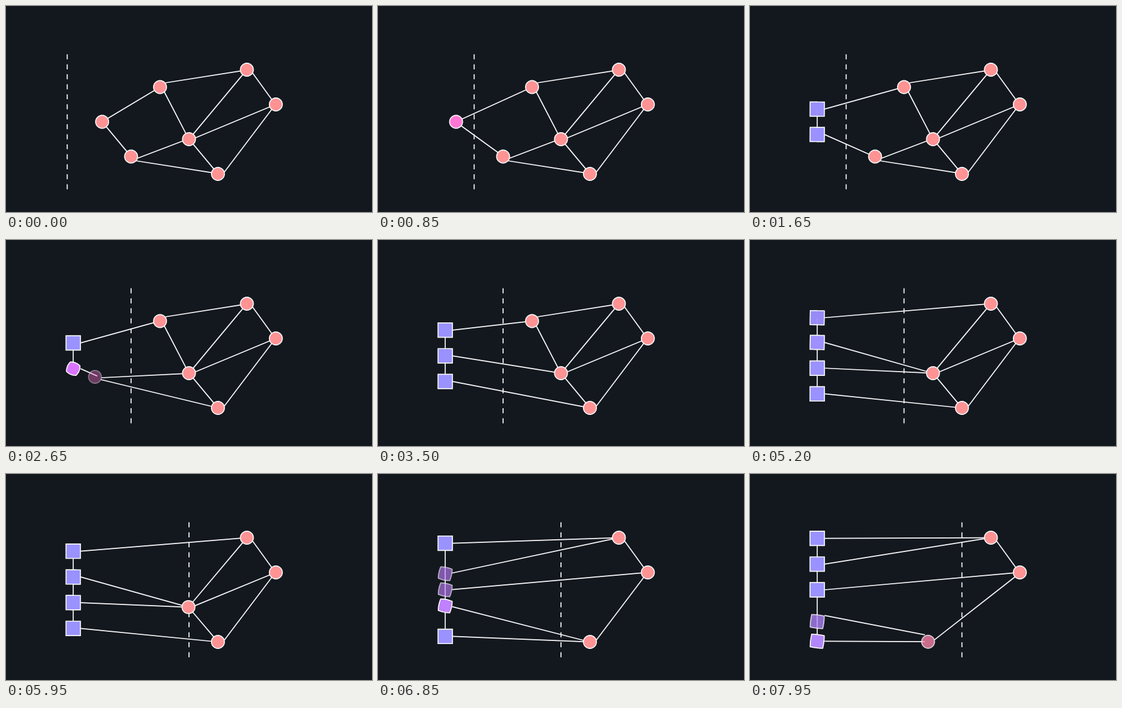
Animation of 600x338 px, one loop 8000 ms. Source, as an HTML page with a canvas:

```html
<!DOCTYPE html>
<html lang="en">
<head>
<meta charset="utf-8">
<title>Sweep line over a graph</title>
<style>
  html, body { margin: 0; width: 100%; height: 100%; overflow: hidden; background: #13181e; }
  canvas { display: block; }
</style>
</head>
<body>
<canvas id="stage" width="600" height="338"></canvas>
<script>
const ctx = document.getElementById('stage').getContext('2d');
const LOOP = 8000, FRAME = 50, STEP = 600, LEAD = 80;
const BACK = '#13181e', WHITE = '#f8f8fa';
const SALMON = [255, 147, 148], MAGENTA = [255, 100, 252], LAVENDER = [154, 146, 255];
const QUEUE_X = 110.2, MID_Y = 190, GAP = 42.2, RADIUS = 10.6, HALF = 11.8;

const grid = (col, row) => ({ x: 157.6 + 47.46 * col, y: 104.5 + 28.5 * row });
const nodes = {
  A: grid(0, 3), B: grid(1, 5), C: grid(2, 1), D: grid(3, 4),
  E: grid(4, 6), F: grid(5, 0), G: grid(6, 2)
};
const edges = ['AC', 'AB', 'CF', 'CD', 'BD', 'BE', 'DF', 'DG', 'DE', 'FG', 'EG'];
// Where some edges leave their node, relative to its centre.
const exits = {
  CF: [9, -7], CD: [7, 8], BE: [8, 7], BD: [10, 3], DG: [10, -2], EG: [10.5, -3], FG: [9, 5]
};
const events = [
  { node: 'A', ins: [], outs: ['AC', 'AB'], y: MID_Y },
  { node: 'B', ins: ['AB'], outs: ['BD', 'BE'] },
  { node: 'C', ins: ['AC'], outs: ['CF', 'CD'] },
  { node: 'D', ins: ['CD', 'BD'], outs: ['DF', 'DG', 'DE'], y: MID_Y },
  { node: 'E', ins: ['DE', 'BE'], outs: ['EG'], y: MID_Y + 2 * GAP }
];
const sweepStops = [99.3, ...['A', 'B', 'C', 'D', 'E'].map(n => nodes[n].x)];

const lerp = (a, b, u) => a + (b - a) * u;
const mix = (a, b, u) => a.map((v, i) => lerp(v, b[i], u));
const sigmoid = v => 1 / (1 + Math.exp(-v));
const smooth = t => (sigmoid(10 * (t - 0.5)) - sigmoid(-5)) / (1 - 2 * sigmoid(-5));

function toward(from, to, r) {
  const d = Math.hypot(to.x - from.x, to.y - from.y);
  return [from.x + (to.x - from.x) * r / d, from.y + (to.y - from.y) * r / d];
}

function layout(slots) {
  return Object.fromEntries(slots.map((e, i) => [e, MID_Y + (i - (slots.length - 1) / 2) * GAP]));
}

function restLines(slots, done) {
  const ys = layout(slots), lines = {};
  for (const e of edges) {
    if (done.includes(e[1])) continue;
    const queued = e in ys, to = nodes[e[1]];
    const from = queued ? { x: QUEUE_X, y: ys[e] } : nodes[e[0]];
    const exit = exits[e];
    const start = queued ? [from.x + 12, from.y]
      : exit ? [from.x + exit[0], from.y + exit[1]]
      : toward(from, to, RADIUS);
    lines[e] = [...start, ...toward(to, from, RADIUS)];
  }
  return lines;
}

// Resting and merged arrangement around each event.
let slots = [], done = [];
for (const ev of events) {
  ev.slots = slots;
  ev.done = done;
  ev.before = restLines(slots, done);
  ev.ys = layout(slots);
  ev.y = ev.y ?? ev.ys[ev.ins[0]];
  ev.merged = { ...ev.before };
  for (const e of ev.ins) {
    const [x, y] = ev.before[e];
    ev.merged[e] = [x, y, x, y];
  }
  const hub = { x: QUEUE_X, y: ev.y };
  for (const e of ev.outs) {
    const to = nodes[e[1]];
    ev.merged[e] = [...toward(hub, to, RADIUS), ...toward(to, hub, RADIUS)];
  }
  const at = ev.ins.length ? slots.indexOf(ev.ins[0]) : 0;
  slots = [...slots.slice(0, at), ...ev.outs, ...slots.slice(at + ev.ins.length)];
  done = [...done, ev.node];
  ev.nextSlots = slots;
  ev.nextYs = layout(slots);
  ev.after = restLines(slots, done);
}

function stroke(x1, y1, x2, y2) {
  ctx.beginPath();
  ctx.moveTo(x1, y1);
  ctx.lineTo(x2, y2);
  ctx.stroke();
}

// Blend of square (round = 0) and circle (round = 1), paired from the square's
// upper right corner and the circle's rightmost point, anticlockwise.
function blob(x, y, round, color, alpha = 1) {
  const corners = [[1, -1], [-1, -1], [-1, 1], [1, 1], [1, -1]];
  ctx.beginPath();
  for (let i = 0; i < 64; i++) {
    const side = i >> 4, angle = i / 64 * 2 * Math.PI;
    const [sx, sy] = mix(corners[side], corners[side + 1], i % 16 / 16);
    ctx.lineTo(x + lerp(sx * HALF, Math.cos(angle) * RADIUS, round),
               y + lerp(sy * HALF, -Math.sin(angle) * RADIUS, round));
  }
  ctx.closePath();
  ctx.globalAlpha = alpha;
  ctx.fillStyle = `rgb(${color.map(Math.round)})`;
  ctx.fill();
  ctx.stroke();
  ctx.globalAlpha = 1;
}

function queueItems(ev, phase, u) {
  const splitting = phase === 2;
  return (splitting ? ev.nextSlots : ev.slots).map(e => {
    const group = splitting ? ev.outs : ev.ins;
    const active = phase > 0 && group.includes(e);
    const last = e === group[group.length - 1];
    const from = splitting ? (active ? ev.y : ev.ys[e]) : ev.ys[e];
    const to = splitting ? ev.nextYs[e] : active ? ev.y : from;
    return {
      y: lerp(from, to, u),
      round: active ? (splitting ? 1 - u : u) : 0,
      alpha: active && !last ? (splitting ? u : 1 - u) : 1
    };
  });
}

function draw(time) {
  const clock = (time + LEAD) / STEP, step = Math.floor(clock);
  const index = Math.floor(step / 3), phase = step % 3;
  const ev = events[index], u = smooth(clock - step);

  ctx.fillStyle = BACK;
  ctx.fillRect(0, 0, 600, 338);
  ctx.strokeStyle = WHITE;
  ctx.lineWidth = 1.7;

  const sweepX = lerp(sweepStops[index], sweepStops[index + 1], phase ? 1 : u);
  ctx.setLineDash([8.2, 8.2]);
  stroke(sweepX, 79.3, sweepX, 301);
  ctx.setLineDash([]);

  const [from, to] = [[ev.before, ev.before], [ev.before, ev.merged], [ev.merged, ev.after]][phase];
  for (const e in to) stroke(...mix(from[e], to[e], u));

  const items = queueItems(ev, phase, u);
  if (items.length > 1) {
    stroke(QUEUE_X, items[0].y, QUEUE_X, items[items.length - 1].y);
  }

  for (const name in nodes) {
    const { x, y } = nodes[name];
    if (!ev.done.includes(name) && name !== ev.node) blob(x, y, 1, SALMON);
  }
  for (const item of items) {
    blob(QUEUE_X, item.y, item.round, mix(LAVENDER, MAGENTA, item.round), item.alpha);
  }
  if (phase < 2) {
    const { x, y } = nodes[ev.node], v = phase ? u : 0;
    blob(lerp(x, QUEUE_X, v), lerp(y, ev.y, v), 1, mix(SALMON, MAGENTA, v),
         ev.ins.length ? 1 - v : 1);
  }
}

const begin = performance.now();
function tick() {
  const time = (performance.now() - begin) % LOOP;
  draw(Math.floor(time / FRAME) * FRAME);
  requestAnimationFrame(tick);
}
tick();
</script>
</body>
</html>
```
